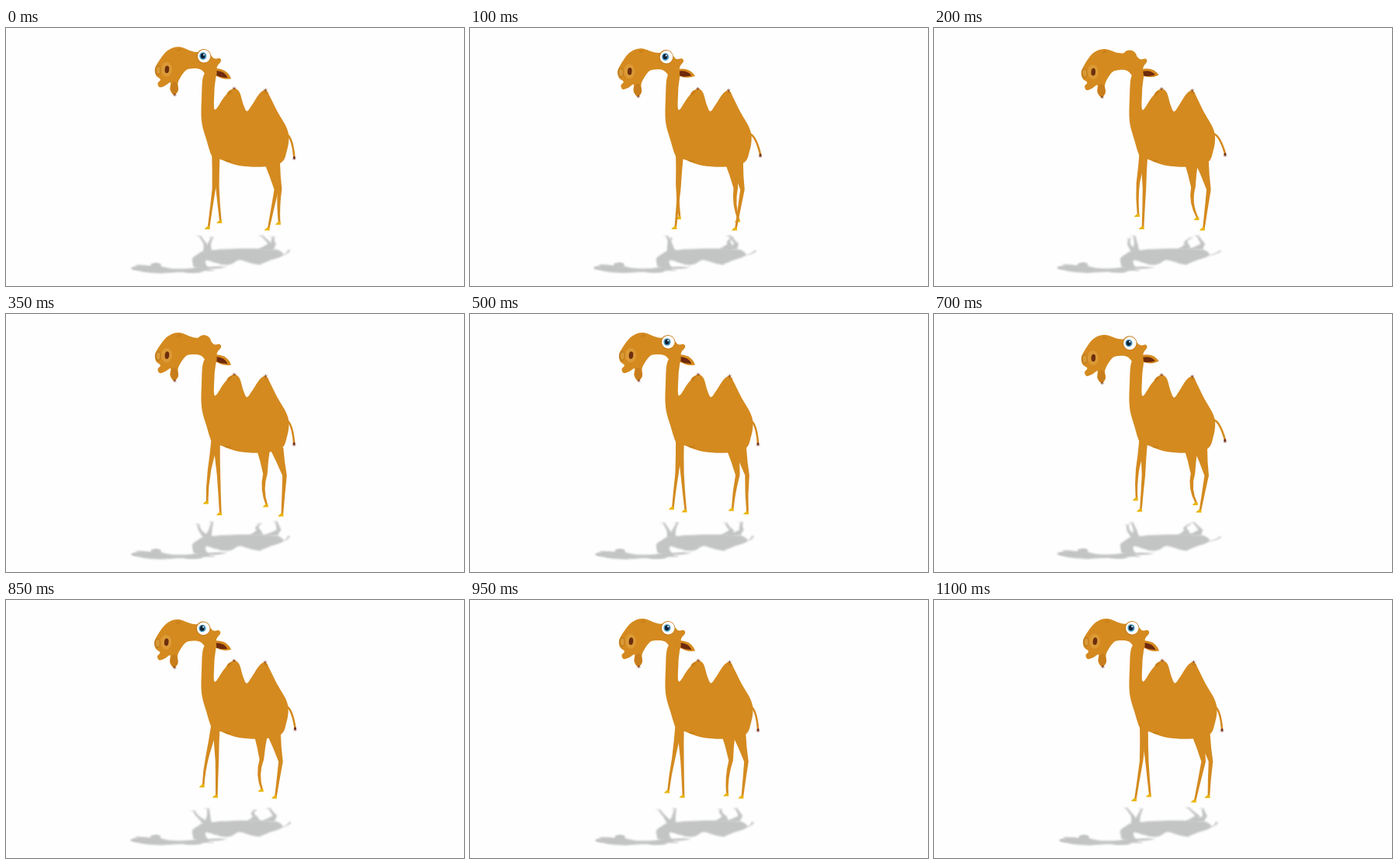
An HTML page with a canvas that plays this animation: 590 by 332 pixels, repeating every 1150 ms.

```html
<!DOCTYPE html>
<html lang="en">
<head>
<meta charset="utf-8">
<title>Walking camel</title>
<style>
html, body { margin: 0; width: 100%; height: 100%; overflow: hidden; background: #fefefe; }
canvas { display: block; width: 100vw; height: 100vh; }
</style>
</head>
<body>
<canvas id="stage" width="590" height="332"></canvas>
<script>
const ctx = document.getElementById('stage').getContext('2d');
const LOOP = 1150, STEP = 50;
const FUR = '#d48a1f', SPOT = '#c98019', HOOF = '#e9b40c', HAIR = '#74301a';
const SHADE = '#c3c4c4';

// Outlines as key points, joined by a smooth curve
const BODY = [
  [270, 54], [268.5, 80], [269, 105], [281, 89], [292.5, 78], [300.5, 82], [306, 99],
  [310.5, 107], [317, 99], [327, 84], [335, 80], [341, 90], [350, 108], [361, 127],
  [364.5, 141], [362, 158], [355, 173], [332, 178.5], [300, 177], [276, 169],
  [266, 166], [258, 143], [252, 120], [252, 90], [255, 60]
];
const HEAD = [
  [263, 67], [252, 54], [240, 52], [231, 55], [222, 69], [222, 80], [216.5, 86],
  [211.5, 79], [212, 70], [205, 74], [198, 76], [195.5, 71], [199, 66], [193.5, 61],
  [192, 53], [196, 44], [208, 29], [223, 24], [241, 30], [260, 32], [268, 39],
  [275.5, 39], [277, 43], [272, 50], [271, 62]
];

// Foot range, ground line and lift; the far legs run out of step
const LEGS = [
  { x: 258, reach: 20, ground: 253.5, lift: 12, delay: 520 },
  { x: 253, reach: 26, ground: 258, lift: 20, delay: 0 },
  { x: 335, reach: 18.5, ground: 254.5, lift: 8.5, delay: 520, rear: true },
  { x: 329, reach: 30, ground: 259.5, lift: 15.5, delay: 0, rear: true }
];

let flat = null; // single colour while the shadow is drawn
const paint = color => flat || color;
const ease = u => (1 - Math.cos(Math.PI * u)) / 2;

function bobAt(t) {
  return 1.12 * Math.cos(Math.PI * (t - 165) / (LOOP / 2)) ** 6;
}

// Swing forward for 430 ms, then drift back with the ground
function footAt(t) {
  const SWING = 430, LIFT = 670;
  const since = (t - 420 + LOOP) % LOOP;
  const back = since < SWING ? 1 - ease(since / SWING)
    : ((since - SWING) / (LOOP - SWING)) ** 1.5;
  const u = (since - 10) / LIFT;
  const lift = u > 0 && u < 1 ? Math.sin(Math.PI * u) ** 1.5 : 0;
  return { back, lift };
}

function closed(pts, fill) {
  const n = pts.length, at = i => pts[(i + n) % n];
  ctx.beginPath();
  ctx.moveTo(...pts[0]);
  for (let i = 0; i < n; i++) {
    const [a, b, c, d] = [at(i - 1), at(i), at(i + 1), at(i + 2)];
    ctx.bezierCurveTo(b[0] + (c[0] - a[0]) / 6, b[1] + (c[1] - a[1]) / 6,
      c[0] - (d[0] - b[0]) / 6, c[1] - (d[1] - b[1]) / 6, ...c);
  }
  ctx.fillStyle = paint(fill);
  ctx.fill();
}

function oval(x, y, rx, ry, fill, turn = 0) {
  ctx.beginPath();
  ctx.ellipse(x, y, rx, ry, turn, 0, 7);
  ctx.fillStyle = paint(fill);
  ctx.fill();
}

function line(color, width, x, y, cx, cy, x2 = cx, y2 = cy) {
  ctx.beginPath();
  ctx.moveTo(x, y);
  ctx.quadraticCurveTo(cx, cy, x2, y2);
  ctx.strokeStyle = paint(color);
  ctx.lineWidth = width;
  ctx.stroke();
}

function tuft(x, y, dir) {
  for (const k of [-2, 0, 2]) line(HAIR, .8, x, y, x + k, y + dir * (3.4 - Math.abs(k) / 2));
}

function drawLeg(leg, t) {
  const { back, lift } = footAt(t + leg.delay);
  const fx = leg.x + leg.reach * back, fy = leg.ground - leg.lift * lift;
  const ax = fx + 1, ay = fy - 1, aw = 1.3;
  let kx, ky, kw, hx, hy, hw, bow;
  if (leg.rear) {
    kx = 349.5 + (fx - 339) * .6 - 16 * lift;
    ky = 208 - 3 * lift;
    hx = 332 + (kx - 335) * .68;
    [hy, hw, kw, bow] = [172, 9, 2.8, 8 * lift];
  } else {
    kx = 271 + (fx - 268) * .4 - 6 * lift;
    ky = 207 - 8 * lift;
    hx = 270.5 + (kx - 271) * .1;
    [hy, hw, kw, bow] = [160, 5, 2.2, 2 * lift];
  }
  const mx = (hx + kx) / 2, my = (hy + ky) / 2, mw = hw * .4 + kw * .5;
  const sx = (kx + ax) / 2 - bow, sy = (ky + ay) / 2, sw = (kw + aw) / 2 - .2;
  ctx.beginPath();
  ctx.moveTo(hx - hw, hy);
  ctx.quadraticCurveTo(mx - mw, my, kx - kw, ky);
  ctx.quadraticCurveTo(sx - sw, sy, ax - aw, ay);
  ctx.lineTo(ax + aw, ay);
  ctx.quadraticCurveTo(sx + sw, sy, kx + kw, ky);
  ctx.quadraticCurveTo(mx + mw, my, hx + hw, hy);
  ctx.fillStyle = paint(FUR);
  ctx.fill();

  ctx.beginPath();
  ctx.moveTo(ax - aw, ay - 2);
  ctx.lineTo(ax + aw, ay - 2);
  ctx.lineTo(ax + 1.8, fy + 1);
  ctx.lineTo(fx - 4.5, fy + 1);
  ctx.quadraticCurveTo(fx - 3, fy - 1, ax - aw, ay - 2);
  ctx.fillStyle = paint(HOOF);
  ctx.fill();
}

function drawBody(d) {
  ctx.save();
  ctx.translate(252, 178);
  ctx.scale(1 - .021 * d, 1 - .006 * d);
  ctx.translate(-252, -178);
  closed(BODY, FUR);
  oval(288, 83, 4, 2, SPOT, -.8);
  oval(335, 83, 2.5, 1.5, SPOT);
  oval(286, 171, 4, 1.5, SPOT, .2);
  tuft(294, 79, -1);
  tuft(334.5, 81, -1);
  ctx.restore();
}

function drawTail(d) {
  const x = 371 + 4 * d, y = 166 - 4.5 * d;
  line(FUR, 2.6, 362 - 2 * d, 137 - d, 369 - d, 142 - 4 * d, x, y);
  oval(x, y + 1, 1.6, 1.8, HAIR);
  tuft(x, y + 1, 1);
}

function leaf(x, y, tipX, tipY, low, fill) {
  ctx.beginPath();
  ctx.moveTo(x, y);
  ctx.quadraticCurveTo(tipX * .78, y + 1, tipX, tipY);
  ctx.quadraticCurveTo(tipX * .45, low, x, 5);
  ctx.fillStyle = paint(fill);
  ctx.fill();
}

function drawEar(d) {
  ctx.save();
  ctx.translate(271, 56);
  ctx.rotate(-.24 * d);
  leaf(-1, -4, 19, 9.5, 11.5, FUR);
  leaf(0, -1, 14.5, 8, 8.5, '#6e2a0c');
  ctx.restore();
}

function drawEye(shut) {
  oval(255, 36.2, 9.3, 9.3, shut ? FUR : '#c47a18');
  if (shut) return;
  oval(255.3, 36.2, 8.3, 8.3, '#fff');
  oval(254, 36, 4.6, 4.8, '#4f9cc4');
  oval(253.8, 35.8, 2.9, 3.4, '#0d2338');
  oval(255.2, 34.3, 1, 1, '#fff');
}

function drawHead(d, shut) {
  ctx.save();
  ctx.translate(265 - 2 * d, 60 + d);
  ctx.rotate(-.045 * d);
  ctx.translate(-265, -60);
  drawEar(d);
  closed(HEAD, FUR);
  oval(223, 28, 3, 1.5, SPOT, -.2);
  oval(217, 77, 4.6, 8, '#c87d1c');
  oval(196, 54, 4, 6.5, '#bf7d20');
  oval(196.3, 54, 2.4, 4.6, '#d99a35');
  oval(207, 53, 7, 9.5, '#dc9a36');
  oval(207.5, 53, 2.8, 4.8, '#6b2f0e', .1);
  tuft(217.5, 84.5, 1);
  drawEye(shut);
  ctx.restore();
}

// Mirror onto the floor: stage x "from" lands on "to"
function project(from, to, stretch) {
  const drop = .205;
  ctx.setTransform(stretch, 0, 0, -drop, to - from * stretch, 284 + 178 * drop);
}

function drawTrunk(t, d) {
  drawTail(d);
  for (const leg of LEGS) drawLeg(leg, t);
  drawBody(d);
}

function drawShadow(t, d) {
  ctx.save();
  ctx.filter = 'blur(1.2px)';
  flat = SHADE;
  project(267, 256, 1.04);
  drawTrunk(t, d);
  project(289, 284, 1.26);
  drawHead(d, true);
  flat = null;
  ctx.restore();
}

function draw(now) {
  const t = Math.floor(now % LOOP / STEP) * STEP;
  const d = bobAt(t);
  ctx.fillStyle = '#fefefe';
  ctx.fillRect(0, 0, 590, 332);
  drawShadow(t, d);
  drawTrunk(t, d);
  drawHead(d, t >= 150 && t <= 400);
}

let start;
function tick(now) {
  start ??= now;
  draw(now - start);
  requestAnimationFrame(tick);
}
draw(0);
requestAnimationFrame(tick);
</script>
</body>
</html>
```
